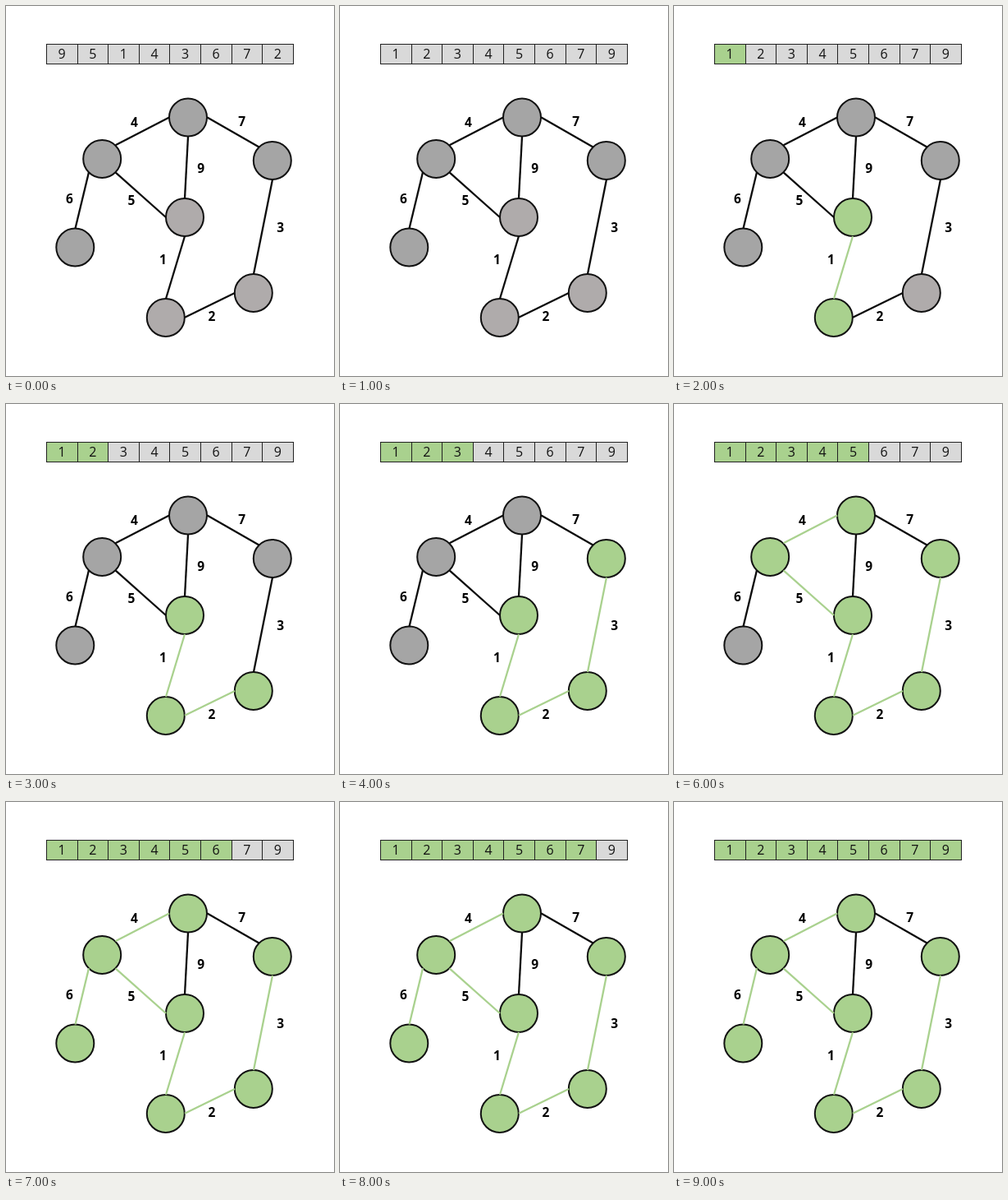
These frames come from a looping animation (400x450 px, 10 s). An HTML page:

```html
<!DOCTYPE html>
<html lang="en">
<head>
<meta charset="utf-8">
<title>Minimum spanning tree</title>
<style>
  html, body { margin: 0; width: 100%; height: 100%; overflow: hidden; background: #fff; }
  svg { display: block; width: 400px; height: 450px; }
  text { font-family: "Open Sans", "Noto Sans", sans-serif; font-size: 16px; text-anchor: middle; fill: #111; }
  .label { font-size: 15.5px; font-weight: 700; fill: #000; }
  .cell { stroke: #222; stroke-width: 1; }
  .node { stroke: #111; stroke-width: 2; }
</style>
</head>
<body>
<svg id="stage" viewBox="0 0 400 450"></svg>
<script>
const GREEN = '#a9d18e', CELL = '#d9d9d9', GRAY = '#a5a5a5', WARM = '#afabab', BLACK = '#0c0c0c';
const STEP = 1000, LOOP = 10000;
const unsorted = [9, 5, 1, 4, 3, 6, 7, 2];
const sorted = [...unsorted].sort((a, b) => a - b);

// x, y, idle colour, step at which the node joins the tree
const nodes = [
  [222, 135.5, GRAY, 5], [117.2, 186, GRAY, 5], [324.8, 188, GRAY, 4],
  [218, 257, WARM, 2], [84.3, 293.5, GRAY, 7], [301.8, 349, WARM, 3],
  [194.8, 379, WARM, 2]
];

// weight, x1, y1, x2, y2, label x, label y, step at which it is accepted
const edges = [
  [4, 133.5, 169.3, 199, 135.5, 156.5, 147.3, 5],
  [7, 245.5, 135.5, 308.5, 171.5, 287.7, 146, Infinity],
  [9, 222, 159, 218, 234, 237.7, 203.3, Infinity],
  [5, 133.5, 202.3, 195, 257, 153, 242.3, 6],
  [6, 101, 202.3, 84.5, 270.5, 77.5, 239.8, 7],
  [1, 218, 280, 195, 356, 191.5, 314.3, 2],
  [2, 218, 378.7, 279, 349, 251, 383, 3],
  [3, 325, 211, 302, 326, 334.7, 275, 4]
];

const stage = document.getElementById('stage');
function add(tag, attrs, content = '') {
  const el = document.createElementNS('http://www.w3.org/2000/svg', tag);
  for (const key in attrs) el.setAttribute(key, attrs[key]);
  el.textContent = content;
  return stage.appendChild(el);
}

const cellX = i => Math.round(49 + i * 37.6) + 0.5;
const cells = sorted.map((_, i) => ({
  box: add('rect', { class: 'cell', x: cellX(i), y: 46.5, width: cellX(i + 1) - cellX(i), height: 24 }),
  digit: add('text', { x: 68.2 + i * 37.6, y: 64.3 })
}));
const circles = nodes.map(([cx, cy]) => add('circle', { class: 'node', cx, cy, r: 23 }));
const lines = edges.map(([, x1, y1, x2, y2]) => add('line', { x1, y1, x2, y2, 'stroke-width': 2.3 }));
edges.forEach(([weight, , , , , x, y]) => add('text', { class: 'label', x, y }, weight));

function render(step) {
  const values = step ? sorted : unsorted;
  cells.forEach(({ box, digit }, i) => {
    box.setAttribute('fill', i < step - 1 ? GREEN : CELL);
    digit.textContent = values[i];
  });
  nodes.forEach(([, , idle, joined], i) => circles[i].setAttribute('fill', step >= joined ? GREEN : idle));
  edges.forEach((edge, i) => lines[i].setAttribute('stroke', step >= edge[7] ? GREEN : BLACK));
}

let start, shown = 0;
function tick(now) {
  start ??= now;
  const step = Math.floor(((now - start) % LOOP) / STEP);
  if (step !== shown) render(shown = step);
  requestAnimationFrame(tick);
}
render(0);
requestAnimationFrame(tick);
</script>
</body>
</html>
```
